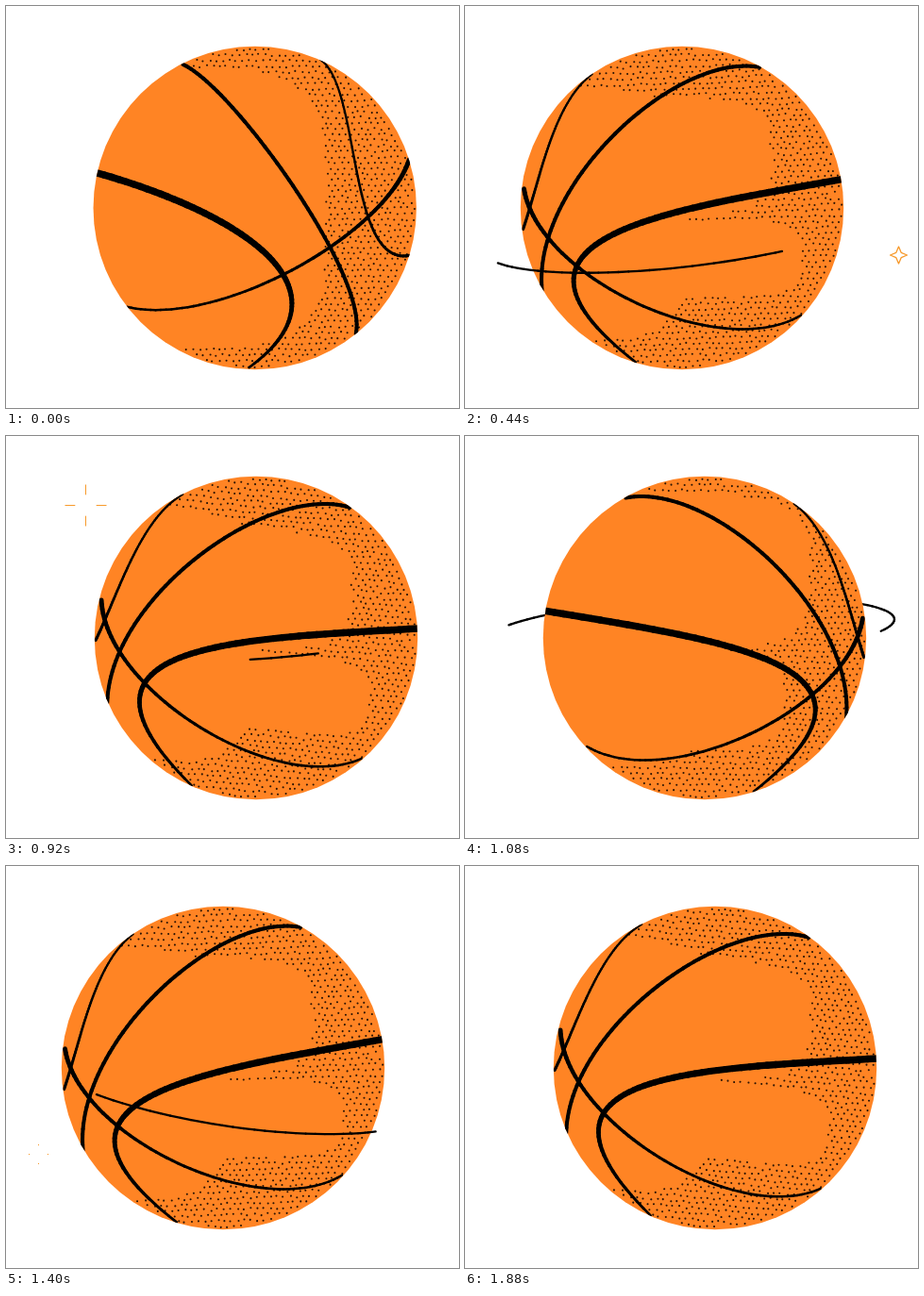
These frames come from a looping animation (480x426 px, 1.92 s). An HTML page with a canvas:

```html
<!DOCTYPE html>
<html lang="en">
<head>
<meta charset="utf-8">
<title>Spinning basketball</title>
<style>
html, body { margin: 0; width: 100%; height: 100%; overflow: hidden; background: #fff; }
canvas { display: block; width: 480px; height: 426px; }
</style>
</head>
<body>
<canvas id="stage" width="480" height="426"></canvas>
<script>
const ctx = document.getElementById('stage').getContext('2d');
const LOOP = 1920, STEP = 40, RADIUS = 171.2, BALL_Y = 214;
const RAD = Math.PI / 180;
const cosd = a => Math.cos(a * RAD), sind = a => Math.sin(a * RAD);
const lerp = (a, b, k) => a + (b - a) * k;
const clamp = (v, lo, hi) => Math.min(hi, Math.max(lo, v));

// Each seam is one cubic curve; poses in between are blends of these two.
const facing = { x: 263.5, tilt: 2.9, seams: [
  [96, 177, 255, 222, 372, 300, 258, 383],
  [187, 62, 240, 85, 385, 285, 371, 347],
  [128, 319, 222, 342, 400, 245, 427, 163],
  [333, 57, 376, 85, 362, 275, 427, 264]
] };
const turned = { x: 241, tilt: -0.5, seams: [
  [71, 188, 270, 218, 462, 240, 295, 376],
  [155, 67, 245, 48, 400, 185, 392, 297],
  [118, 331, 205, 380, 395, 285, 408, 190],
  [333, 70, 375, 100, 390, 175, 410, 232]
] };
const seamWidths = [[7.5, 2.5], [4, 4], [2.5, 5], [2.2, 3.2]];

// Stipple covers the ball except for rounded patches of light: x, y, half width, half height.
const leftLight = [-110, 5, 110, 133];
const shades = {
  facing: stipple([[-90, 0, 165, 148]]),
  turned: stipple([leftLight, [-60, -70, 170, 82], [-75, 65, 160, 55]]),
  mirrored: stipple([leftLight, [-40, -54, 135, 62], [30, 56, 95, 40]])
};

function stipple(lights) {
  let seed = 7;
  const jitter = () => (seed = seed * 16807 % 2147483647) / 2147483647 * 2.4 - 1.2;
  const isLit = (x, y) => lights.some(([cx, cy, a, b]) => ((x - cx) / a) ** 4 + ((y - cy) / b) ** 4 < 1);
  const dots = [];
  for (let gy = -174; gy < 174; gy += 6) {
    for (let gx = -174; gx < 174; gx += 7) {
      const x = gx + (gy / 6 & 1) * 3.5 + jitter(), y = gy + jitter();
      if (Math.hypot(x, y) < RADIUS - 2 && !isLit(x, y)) dots.push([x, y]);
    }
  }
  return dots;
}

function segment(from, to, width) {
  ctx.lineWidth = width;
  ctx.beginPath();
  ctx.moveTo(...from);
  ctx.lineTo(...to);
  ctx.stroke();
}

function drawSeam(index, mix) {
  const a = facing.seams[index], b = turned.seams[index];
  const control = (i, axis) => axis
    ? lerp(a[i * 2 + 1], b[i * 2 + 1], mix) - BALL_Y
    : lerp(a[i * 2] - facing.x, b[i * 2] - turned.x, mix);
  const point = k => [0, 1].map(axis =>
    [1, 3, 3, 1].reduce((sum, c, i) => sum + c * (1 - k) ** (3 - i) * k ** i * control(i, axis), 0));
  const [thickStart, thickEnd] = seamWidths[index];
  const cuts = 60;
  for (let n = 0; n < cuts; n++) {
    const k = n / cuts;
    segment(point(k), point(k + 1 / cuts), lerp(thickStart, thickEnd, k * k));
  }
}

function drawBall(t, frame) {
  const x = 247.5 + 17.7 * cosd((t - 897) * 0.375);
  const tilt = 3.7 * cosd((t - 860) * 0.375);
  // The seams repeat every half turn, so the spin is kept within 180 degrees.
  const turn = 22.5 + 75 * frame;
  const spin = (turn + 10.5 * cosd(2 * turn - 15) - 1.9) % 180;
  const mirrored = spin > 90;
  const mix = ((mirrored ? 180 - spin : spin) - 30) / 30;
  const rest = mirrored ? -2 : lerp(facing.tilt, turned.tilt, clamp(mix, 0, 1));

  ctx.save();
  ctx.translate(x, BALL_Y);
  ctx.beginPath();
  ctx.arc(0, 0, RADIUS, 0, 7);
  ctx.fillStyle = '#ff8424';
  ctx.fill();
  ctx.clip();
  ctx.rotate((tilt - rest) * RAD);

  ctx.fillStyle = '#2a1304';
  ctx.beginPath();
  const shade = mirrored ? shades.mirrored : mix < 0.5 ? shades.facing : shades.turned;
  for (const [dx, dy] of shade) {
    ctx.moveTo(dx + 1.05, dy);
    ctx.arc(dx, dy, 1.05, 0, 7);
  }
  ctx.fill();

  if (mirrored) ctx.scale(-1, 1);
  ctx.strokeStyle = '#000';
  seamWidths.forEach((_, i) => drawSeam(i, mix));
  ctx.restore();
}

// Tail and head are orbit angles at time `at`: 0 is the front, 90 the right, 180 the back.
const trails = [
  { x: 237, y: 233, a: 218, b: 43, slope: -0.115, at: 440, until: 840,
    tail: -68, tailSpeed: 0.48, head: 27, headSpeed: 0.57, last: 215 },
  { x: 240, y: 205, a: 215, b: 33, slope: -0.05, at: 920, until: 1240,
    tail: 5, tailSpeed: 0.4, head: 25, headSpeed: 1.37, last: 245 },
  { x: 237, y: 221, a: 215, b: 55, slope: 0.144, at: 1400, until: 1800,
    tail: -41, tailSpeed: 0.55, head: 46, headSpeed: 0.55, last: 215 }
];

function drawTrail(trail, t, front) {
  if (t > trail.until) return;
  const age = t - trail.at;
  const tail = Math.max(-95, trail.tail + trail.tailSpeed * age);
  const head = Math.min(trail.last, trail.head + trail.headSpeed * age);
  const point = u => {
    const dx = trail.a * sind(u);
    return [trail.x + dx, trail.y + dx * trail.slope + trail.b * cosd(u)];
  };
  ctx.strokeStyle = '#000';
  for (let u = tail; u < head; u += 3) {
    const end = Math.min(u + 3, head);
    if ((cosd((u + end) / 2) > 0) === front) segment(point(u), point(end), 2.3);
  }
}

const sparkles = [
  { x: 459.5, y: 264, start: 360, size: 13 },
  { x: 84.5, y: 73.5, start: 780, size: 22 },
  { x: 34.5, y: 305.5, start: 1160, size: 10.5 }
];

// A sparkle opens as a star, then bursts into four rays that shrink outwards.
function drawSparkle({ x, y, start, size }, t) {
  const p = (t - start) / 260;
  if (p <= 0 || p > 1) return;
  ctx.strokeStyle = '#f79a2c';
  if (p < 0.4) {
    const r = size * p * 2.25;
    ctx.lineWidth = 1.3;
    ctx.beginPath();
    for (let i = 0; i < 8; i++) {
      const d = i % 2 ? r * 0.42 : r;
      ctx.lineTo(x + d * cosd(i * 45), y + d * sind(i * 45));
    }
    ctx.closePath();
    ctx.stroke();
    return;
  }
  const inner = size * (p - 0.03);
  ctx.lineCap = 'butt';
  for (let a = 0; a < 360; a += 90) {
    segment([x + inner * cosd(a), y + inner * sind(a)], [x + size * cosd(a), y + size * sind(a)], 1);
  }
  ctx.lineCap = 'round';
}

function draw(now) {
  const frame = Math.floor((now % LOOP) / STEP), t = frame * STEP;
  ctx.fillStyle = '#fff';
  ctx.fillRect(0, 0, 480, 426);
  ctx.lineCap = ctx.lineJoin = 'round';
  trails.forEach(trail => drawTrail(trail, t, false));
  drawBall(t, frame);
  trails.forEach(trail => drawTrail(trail, t, true));
  sparkles.forEach(sparkle => drawSparkle(sparkle, t));
}

const began = performance.now();
function tick() {
  draw(performance.now() - began);
  requestAnimationFrame(tick);
}
tick();
</script>
</body>
</html>
```
